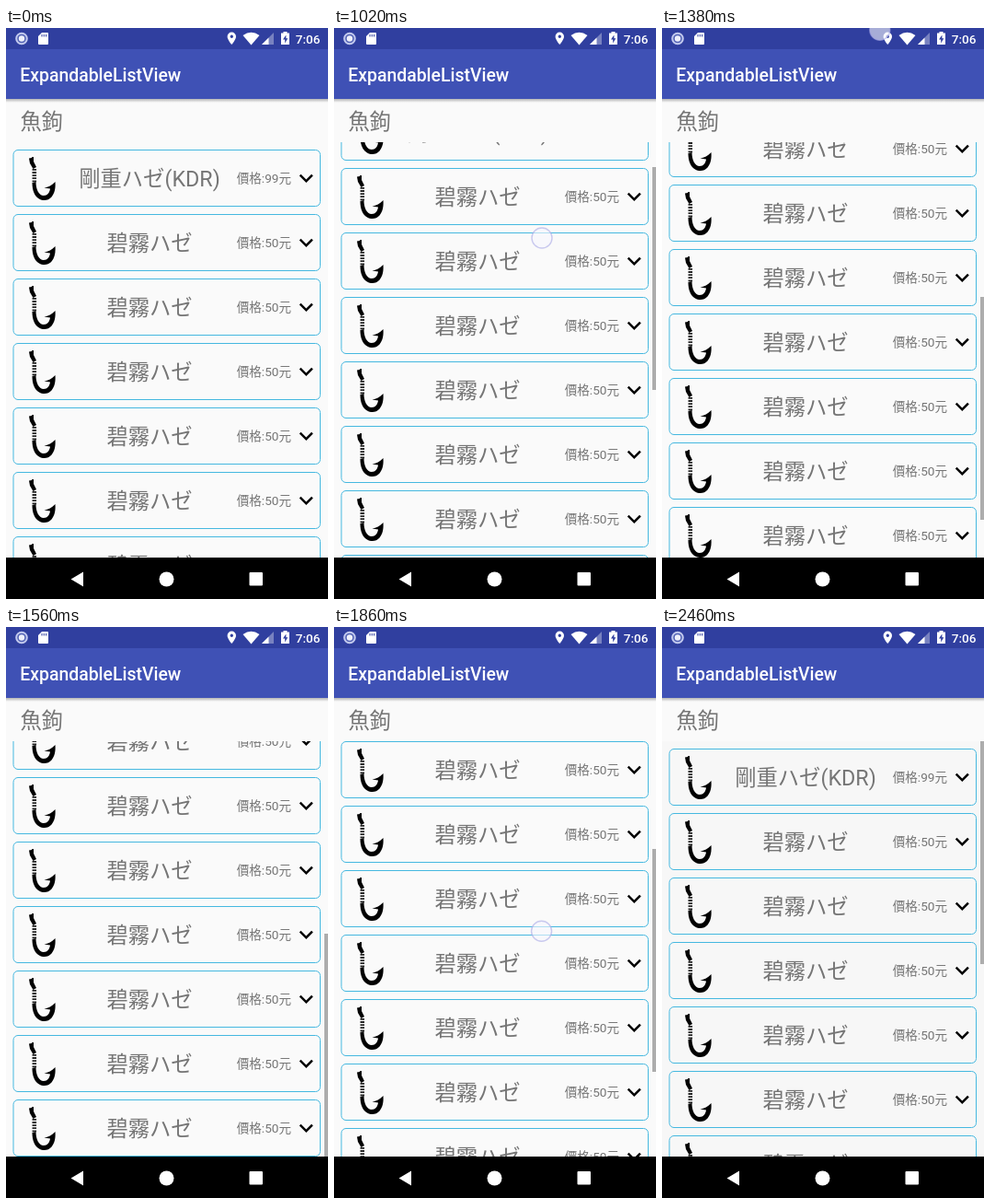
Recreate the animation shown at these times as an HTML page. Size 350 px wide and 620 px high, loop 3120 ms.

```html
<!DOCTYPE html>
<html lang="zh-Hant">
<head>
<meta charset="utf-8">
<title>ExpandableListView</title>
<style>
  html, body { margin: 0; width: 100%; height: 100%; overflow: hidden; background: #fafafa; }
  svg { display: block; width: 350px; height: 620px; }
  text { font-family: Roboto, 'Noto Sans CJK TC', 'Noto Sans CJK JP', 'Noto Sans CJK', sans-serif; fill: #757575; }
  .big { font-size: 23.3px; }
  .price { font-size: 13.6px; }
  .bar { font-weight: 500; fill: #fff; }
</style>
</head>
<body>
<svg viewBox="0 0 350 620">
  <defs>
    <clipPath id="view"><rect y="124" width="350" height="451"/></clipPath>
    <linearGradient id="shade" x2="0" y2="1">
      <stop offset="0" stop-color="#000" stop-opacity=".28"/>
      <stop offset="1" stop-color="#000" stop-opacity="0"/>
    </linearGradient>
    <g id="hook">
      <path d="M25 9.500L28 9V8H30V13L33 19 29.500 21 26 15Z"/>
      <path d="M30.800 21V36" stroke="#222" stroke-width="4.500" stroke-dasharray="1.800 1.300"/>
      <path d="M28.500 36L32.500 35C32.500 43 35.500 50 41 50C45 50 47.500 46.500 48 42.500L41.500 41.500C46 41 50 38.500 53.500 35C54 42 53 47 49.500 51.500C46 55.500 40.500 56 36 53.500C31 50.500 28.500 44.500 28.500 36Z"/>
    </g>
    <path id="arrow" d="M16.590 8.590L12 13.170 7.410 8.590 6 10l6 6 6-6z" transform="translate(311.300 16) scale(1.250)"/>
  </defs>

  <rect width="350" height="620" fill="#fafafa"/>
  <text class="big" x="15.500" y="110.300">魚鉤</text>

  <g clip-path="url(#view)">
    <rect id="back" y="124" width="350" height="451" fill="#f7f7f7"/>
    <g id="list"></g>
    <rect id="thumb" x="346" width="4" height="242" fill="#adadad"/>
  </g>

  <rect y="77" width="350" height="4" fill="url(#shade)"/>
  <rect y="23" width="350" height="54" fill="#3f51b5"/>
  <rect width="350" height="23" fill="#303f9f"/>
  <text class="bar" x="15.300" y="57.500" font-size="19.400">ExpandableListView</text>

  <g fill="#fff">
    <circle cx="17" cy="11.500" r="5.800" fill="#5262b5" stroke="#c3caee" stroke-width="2"/>
    <circle cx="17" cy="11.500" r="3.200" fill="#eef0fb"/>
    <path d="M39 5H45Q46 5 46 6V17Q46 18 45 18H36Q35 18 35 17V9Z"/>
    <path d="M39 7V9.500M41.300 7V9.500M43.600 7V9.500" stroke="#303f9f"/>
    <path fill-rule="evenodd" d="M245.300 4.500A4.700 4.700 0 0 0 240.600 9.200C240.600 12.700 245.300 18 245.300 18S250 12.700 250 9.200A4.700 4.700 0 0 0 245.300 4.500ZM245.300 7.500A1.700 1.700 0 1 1 245.300 10.900A1.700 1.700 0 1 1 245.300 7.500Z"/>
    <path d="M257.500 8Q266.500 1.500 275.500 8L266.500 18.500Z"/>
    <path d="M291 5V18H278Z" fill-opacity=".35"/>
    <path d="M285.500 10.500V18H278Z"/>
    <path d="M301.500 5.500V4H305.500V5.500H308V18H299V5.500Z"/>
    <path d="M304.400 7.500L301 12.500H303.200V16.500L306.300 11.300H304.400Z" fill="#303f9f"/>
  </g>
  <text class="bar" x="314.700" y="16.500" font-size="13.600">7:06</text>

  <rect y="575" width="350" height="45"/>
  <g fill="#fff">
    <path d="M70.500 598.500L84 590.500V606.500Z"/>
    <circle cx="174.500" cy="598.500" r="8"/>
    <rect x="264.500" y="591" width="14.500" height="14.500" rx="1"/>
  </g>

  <circle id="touch" r="11" fill="#f6f6fd" fill-opacity=".6" stroke="#a9a9e6" stroke-opacity=".6" stroke-width="1.400"/>
</svg>
<script>
  const LOOP = 3120, TICK = 60, TOP = 124, VIEW = 451, PITCH = 70, ROWS = 12;
  const TOTAL = PITCH * ROWS, MAX = TOTAL - VIEW;
  const $ = id => document.getElementById(id);
  const clamp = (v, lo, hi) => Math.min(hi, Math.max(lo, v));
  const show = (id, on) => $(id).style.display = on ? '' : 'none';

  const row = (name, price, i) => `
    <g transform="translate(0 ${TOP + 8 + i * PITCH})">
      <rect x="8" y=".5" width="333.500" height="61" rx="5" fill="none" stroke="#45b8e0"/>
      <use href="#hook"/>
      <text class="big" x="156" y="40.300" text-anchor="middle">${name}</text>
      <text class="price" x="250.700" y="36.300">價格:${price}元</text>
      <use href="#arrow"/>
    </g>`;

  $('list').innerHTML = Array.from({ length: ROWS }, (_, i) =>
    i ? row('碧霧ハゼ', 50, i) : row('剛重ハゼ(KDR)', 99, i)).join('');

  // Swipe up at constant speed; it stalls from 1140 to 1320 ms.
  function swipeUp(t) {
    const u = Math.max(0, t < 1320 ? Math.min(t, 1140) - 840 : t - 960);
    return {
      scroll: clamp(50 + 1.092 * (u - 180), 0, MAX),
      x: 230 - 0.051 * u + 0.00016 * u * u,
      y: 390 - 162 * (u / 180) ** 1.03,
      down: t >= 780 && t < 1440
    };
  }

  // Pull down that slows towards its end.
  function pullDown(t) {
    const n = Math.max(0, (t - 1680) / TICK);
    const y = 96 + 118 * n ** 0.624;
    return {
      scroll: clamp(MAX - 52 * n ** 1.083, 0, MAX),
      x: 234 - 0.036 * (y - 96),
      y,
      down: t < 2220
    };
  }

  function draw(time) {
    const t = Math.floor(time / TICK) * TICK;
    const g = t < 1620 ? swipeUp(t) : pullDown(t);
    const scroll = Math.round(g.scroll);
    $('list').setAttribute('transform', `translate(0 ${-scroll})`);
    $('thumb').setAttribute('y', Math.round(TOP + scroll * VIEW / TOTAL));
    $('touch').setAttribute('transform', `translate(${g.x} ${g.y})`);
    show('touch', g.down);
    show('thumb', t >= 960);
    show('back', t >= 1980);
  }

  const start = performance.now();
  function tick() {
    draw((performance.now() - start) % LOOP);
    requestAnimationFrame(tick);
  }
  tick();
</script>
</body>
</html>
```
